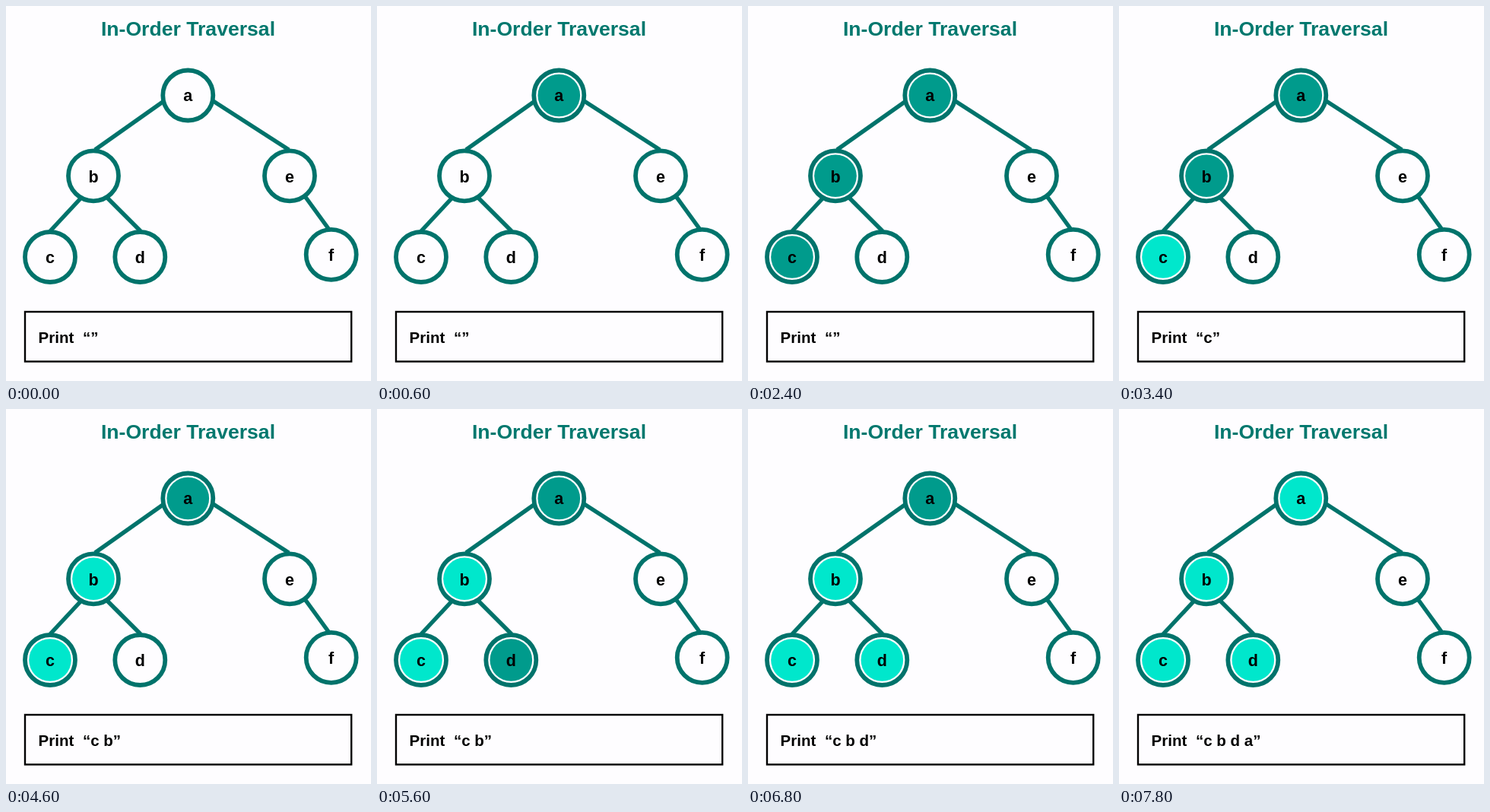
Recreate the animation shown at these times as an HTML page. Size 480 by 493 pixels, loop 8000 ms.

```html
<!DOCTYPE html>
<html lang="en">
<head>
<meta charset="utf-8">
<title>In-Order Traversal</title>
<style>
  html, body { margin: 0; width: 100%; height: 100%; overflow: hidden; background: #fefdff; }
  svg { display: block; width: 100%; height: 100%; }
  text { font-family: "Liberation Sans", Arial, sans-serif; font-weight: bold; }
  .title { font-size: 26.6px; fill: #00786e; text-anchor: middle; }
  .label { font-size: 21.5px; text-anchor: middle; }
  .print { font-size: 20.5px; }
  .edge { stroke: #00736b; stroke-width: 5.5; }
  .ring { fill: #fefdff; stroke: #00736b; stroke-width: 5.8; }
  .box { fill: none; stroke: #000; stroke-width: 2.4; }
</style>
</head>
<body>
<svg id="stage" viewBox="0 0 480 493">
  <text class="title" x="239.5" y="38.5">In-Order Traversal</text>
  <rect class="box" x="25" y="402" width="429.2" height="65.4"/>
  <text class="print" x="42.6" y="443">Print</text>
  <text class="print" id="output" x="101" y="443"></text>
</svg>
<script>
const LOOP = 8000, FIRST = 200, STEP = 1066;
const COLORS = { visited: '#009b8c', printed: '#00e7cc' };

// name: [center x, center y, label baseline]
const NODES = {
  a: [239.3, 117.5, 125], b: [115, 223.3, 231.5], c: [58, 330, 338],
  d: [176.3, 330, 338], e: [373, 223.3, 232], f: [427.7, 326.8, 334.5]
};
const EDGES = [
  [209, 124, 117, 189], [271, 124, 372, 189],
  [99, 252, 58, 296], [133, 252, 177, 296], [393, 250, 425, 294]
];
const STEPS = [
  ['a', 'visited'], ['b', 'visited'], ['c', 'visited'], ['c', 'printed'],
  ['b', 'printed'], ['d', 'visited'], ['d', 'printed'], ['a', 'printed']
];

const stage = document.getElementById('stage');
const output = document.getElementById('output');
const discs = {};

function add(tag, attributes, text = '') {
  const el = document.createElementNS(stage.namespaceURI, tag);
  for (const key in attributes) el.setAttribute(key, attributes[key]);
  el.textContent = text;
  return stage.appendChild(el);
}

for (const [x1, y1, x2, y2] of EDGES) add('line', { class: 'edge', x1, y1, x2, y2 });
for (const [name, [cx, cy, y]] of Object.entries(NODES)) {
  add('circle', { class: 'ring', cx, cy, r: 33 });
  discs[name] = add('circle', { cx, cy, r: 27.8, fill: 'none' });
  add('text', { class: 'label', x: cx, y }, name);
}

function draw(time) {
  const count = Math.max(0, Math.floor((time - FIRST) / STEP) + 1);
  const done = STEPS.slice(0, count);
  const fills = Object.fromEntries(done);
  for (const name in discs) discs[name].setAttribute('fill', COLORS[fills[name]] || 'none');
  const printed = done.filter(([, state]) => state === 'printed').map(([name]) => name);
  output.textContent = `“${printed.join(' ')}”`;
}

const start = performance.now();
function tick() {
  draw((performance.now() - start) % LOOP);
  requestAnimationFrame(tick);
}
tick();
</script>
</body>
</html>
```
